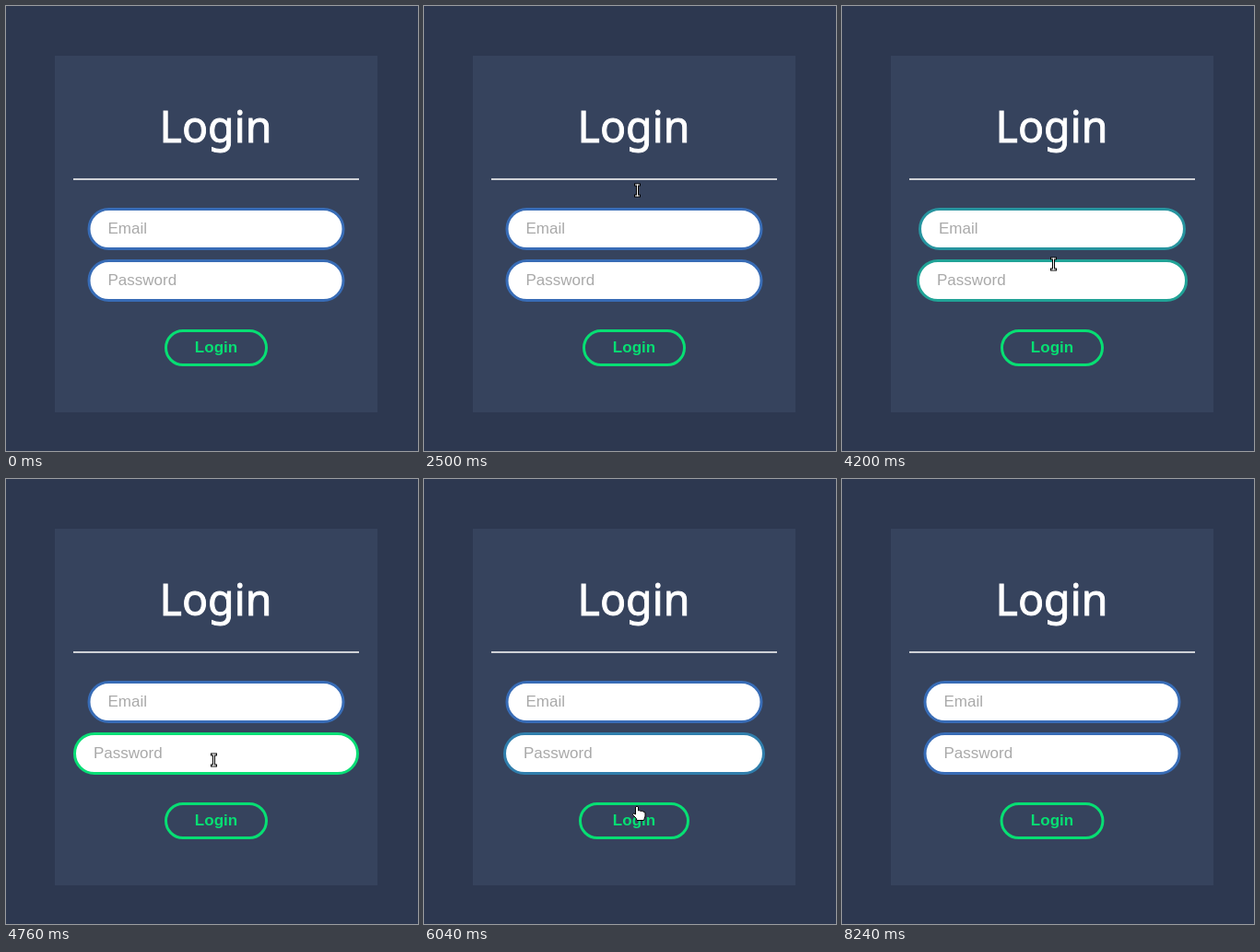
Animation, 447 px wide and 483 px high, one loop 8340 ms. Source, as an HTML page:

```html
<!DOCTYPE html>
<html lang="en">
<head>
<meta charset="utf-8">
<title>Login</title>
<style>
  html, body { margin: 0; width: 100%; height: 100%; overflow: hidden; background: #2d3850; }
  svg { display: block; width: 447px; height: 483px; }
  text { font: 17px "Liberation Sans", Arial, sans-serif; fill: #a9a9a9; }
  .title { font: 46.5px "Noto Sans", sans-serif; fill: #fff; stroke: #fff; stroke-width: .9; text-anchor: middle; }
  .label { font-weight: bold; fill: #07df73; text-anchor: middle; }
  .field rect { fill: #fff; }
  .field rect, #button { stroke-width: 3; }
  #button { fill: none; stroke: #07df73; }
  #cursor path { fill: #fff; stroke: #000; stroke-width: 1; stroke-linejoin: round; }
  #cursor #beam path { fill: none; stroke-width: 3; stroke-linecap: square; stroke-linejoin: miter; }
  #cursor #beam path + path { stroke: #fff; stroke-width: 1; }
</style>
</head>
<body>
<svg viewBox="0 0 447 483">
  <rect x="53" y="54" width="350" height="387" fill="#36435d"/>
  <text class="title" x="227.5" y="148">Login</text>
  <rect x="73" y="187.2" width="310" height="1.6" fill="#f4f4f4"/>
  <g class="field" id="email"><rect y="220.5" height="43" rx="21.5"/><text y="247">Email</text></g>
  <g class="field" id="password"><rect y="276.5" height="43" rx="21.5"/><text y="303">Password</text></g>
  <rect id="button" y="352.5" height="37" rx="18.5"/>
  <text class="label" x="228" y="376">Login</text>
  <g id="cursor">
    <path id="arrow" d="M.5 .5V15.5L4 12.3 6.6 18 9 17 6.5 11.3H11Z"/>
    <g id="beam">
      <path d="M-2 -6h4M0 -6v12M-2 6h4"/>
      <path d="M-2 -6h4M0 -6v12M-2 6h4"/>
    </g>
    <path id="hand" d="M-1.5 9V1Q0 -.7 1.5 1V5Q3 4 4.2 5.5Q6 4.7 7 6.2Q9 5.7 9 8V11L7.5 15.5H0L-1 13L-4.5 9.5Q-4.5 7 -1.5 9Z"/>
  </g>
</svg>
<script>
const LOOP = 8340, FADE = 800, CENTER = 228;
const BLUE = [56, 108, 182], GREEN = [9, 222, 118];
const $ = id => document.getElementById(id);

// Cursor stops: start time, shape, x, y
const stops = [
  [0, ''],
  [1400, 'arrow', 225, 17], [1680, 'arrow', 227, 84],
  [1960, 'arrow', 229, 161], [2240, 'arrow', 229, 198],
  [2500, 'beam', 231.5, 200], [2780, 'beam', 230.5, 242],
  [3660, 'beam', 230.5, 257], [3900, 'beam', 229.5, 280],
  [4220, 'beam', 225.5, 305], [5320, 'beam', 225.5, 311],
  [5600, 'arrow', 229, 330], [5880, 'hand', 231, 355],
  [6160, 'hand', 229, 362], [7400, 'hand', 238, 368],
  [7680, 'arrow', 246, 420], [7960, 'arrow', 252, 465],
  [8240, '']
];

// CSS "ease": cubic-bezier(.25, .1, .25, 1)
function ease(x) {
  if (x <= 0) return 0;
  if (x >= 1) return 1;
  const curve = (a, b, s) => 3 * a * s * (1 - s) ** 2 + 3 * b * s * s * (1 - s) + s ** 3;
  let lo = 0, hi = 1;
  for (let i = 0; i < 24; i++) {
    const mid = (lo + hi) / 2;
    if (curve(.25, .25, mid) < x) lo = mid; else hi = mid;
  }
  return curve(.1, 1, lo);
}

const hover = (t, enter, leave) => ease((t - enter) / FADE) - ease((t - leave) / FADE);
const mix = (a, b, k) => a + (b - a) * k;

// Sets the outer width of a bordered pill and returns its left edge
function setWidth(rect, width) {
  const left = CENTER - width / 2;
  rect.setAttribute('x', left + 1.5);
  rect.setAttribute('width', width - 3);
  return left;
}

function drawField(id, k) {
  const [rect, label] = $(id).children;
  const left = setWidth(rect, mix(279, 310, k));
  rect.style.stroke = `rgb(${BLUE.map((c, i) => Math.round(mix(c, GREEN[i], k)))})`;
  label.setAttribute('x', left + 22);
}

function drawCursor(t) {
  const [, shape, x = 0, y = 0] = stops.filter(s => s[0] <= t).pop();
  for (const id of ['arrow', 'beam', 'hand']) $(id).style.display = id === shape ? '' : 'none';
  $('cursor').setAttribute('transform', `translate(${x} ${y})`);
}

function frame() {
  const t = performance.now() % LOOP;
  drawField('email', hover(t, 2510, 3900));
  drawField('password', hover(t, 3972, 5608));
  setWidth($('button'), mix(112, 132, hover(t, 5844, 7650)));
  drawCursor(t);
  requestAnimationFrame(frame);
}
frame();
</script>
</body>
</html>
```
